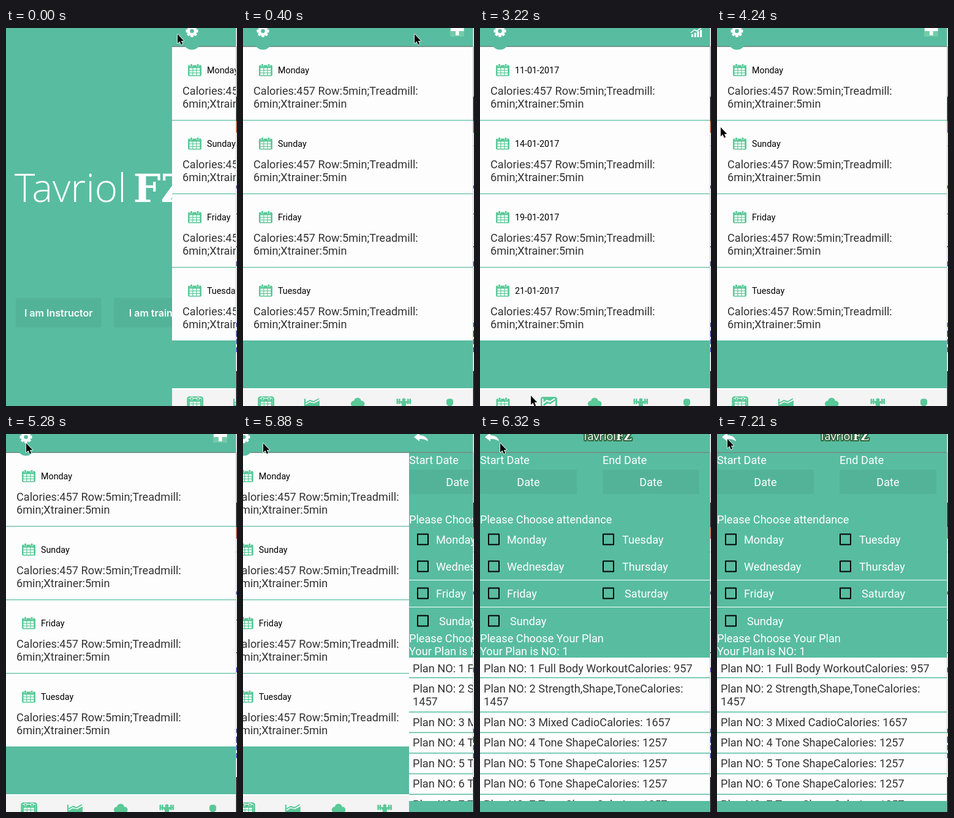
An HTML page with a canvas that plays this animation: 377 px wide and 617 px high, repeating every 8000 ms.

```html
<!DOCTYPE html>
<html lang="en">
<head>
<meta charset="utf-8">
<title>Workout planner</title>
<style>
html, body { margin: 0; width: 377px; height: 617px; overflow: hidden; background: #fff; }
canvas { display: block; }
</style>
</head>
<body>
<canvas id="stage" width="377" height="617"></canvas>
<script>
const c = document.getElementById('stage').getContext('2d');
const LOOP = 8000, W = 375, H = 617;
const TEAL = '#58bca0', DARK = '#53b398', GREEN = '#59c998', INK = '#333';
const BODY = '18.15px Roboto, sans-serif';
const DAYS = ['Monday', 'Sunday', 'Friday', 'Tuesday'];
const DATES = ['11-01-2017', '14-01-2017', '19-01-2017', '21-01-2017'];

function rect(x, y, w, h, color) {
  c.fillStyle = color;
  c.fillRect(x, y, w, h);
}

function round(x, y, w, h, r, color) {
  c.fillStyle = color;
  c.beginPath();
  c.roundRect(x, y, w, h, r);
  c.fill();
}

function disc(x, y, r, color) {
  c.fillStyle = color;
  c.beginPath();
  c.arc(x, y, r, 0, 7);
  c.fill();
}

function text(s, x, y, color = '#fff', font = BODY, align = 'left') {
  c.font = font;
  c.fillStyle = color;
  c.textAlign = align;
  c.fillText(s, x, y);
}

function shape(d, color, x = 0, y = 0) {
  c.save();
  c.translate(x, y);
  c.fillStyle = color;
  c.fill(new Path2D(d));
  c.restore();
}

function line(d, color, width, x = 0, y = 0) {
  c.save();
  c.translate(x, y);
  c.strokeStyle = color;
  c.lineWidth = width;
  c.lineJoin = 'round';
  c.stroke(new Path2D(d));
  c.restore();
}

function header() {
  rect(0, 0, W, 30, TEAL);
  rect(0, 29.5, W, 1.3, '#77857e');
}

function gear(x, y) {
  disc(x, y + 16, 14.5, TEAL);
  for (let i = 0; i < 8; i++) {
    c.save();
    c.translate(x, y);
    c.rotate(i * Math.PI / 4);
    round(-2.4, -10, 4.8, 6, 1, '#fff');
    c.restore();
  }
  disc(x, y, 7.6, '#fff');
  disc(x, y, 3.3, TEAL);
}

function calendar(x, y) {
  round(x, y + 2, 22, 18, 2, GREEN);
  for (const dx of [4, 14.5]) {
    round(x + dx - 0.8, y - 0.8, 4.6, 5.6, 2, '#fff');
    round(x + dx, y, 3, 4.5, 1.5, GREEN);
  }
  for (let i = 0; i < 9; i++)
    rect(x + 2.5 + i % 3 * 6, y + 7 + (i / 3 | 0) * 4.2, 4.8, 3, '#fff');
}

function tabs(active) {
  rect(0, 588, W, 29, '#f4f4f4');
  rect(0, 588, W, 2, '#fff');
  if (active === 0) line('M25.5 617V606Q25.5 602.5 29 602.5H46Q49.8 602.5 49.8 606V617', GREEN, 2.5);
  calendar(26.5, 603);
  if (active === 1) {
    round(99, 602, 27, 20, 4, GREEN);
    line('M102.5 605V617M103 613L109 608L114 610L122 605', '#fff', 2);
    shape('M104 617L110 613L115 614L123 608V617Z', '#f4f4f4');
  } else {
    line('M101 605V617M102 612L109 608L115 610L124 605', GREEN, 2);
    shape('M102 617V615L109 611L116 612.5L125 608V617Z', GREEN);
  }
  disc(187, 609.5, 6, GREEN);
  disc(181, 613.5, 5, GREEN);
  disc(193.5, 613.5, 5, GREEN);
  rect(181, 611, 13, 6, GREEN);
  rect(251, 609, 23, 1.8, GREEN);
  for (const x of [250.5, 254, 268, 271.5]) round(x, 605, 2.6, 9, 1, GREEN);
  disc(262.5, 607, 2.8, GREEN);
  shape('M256 610H269L266 614V617H259V614Z', GREEN);
  shape('M332 609Q332 605 337.5 605Q343 605 343 609V614L340 617H335L332 614Z', GREEN);
}

function listView(history) {
  rect(0, 0, W, H, TEAL);
  header();
  rect(0, 31, W, 479, '#fdfdfd');
  (history ? DATES : DAYS).forEach((label, i) => {
    const y = 30 + i * 120;
    calendar(26, y + 28.5);
    text(label, 57, y + 43.5, '#000', '14.3px Roboto, sans-serif');
    text('Calories:457 Row:5min;Treadmill:', 17, y + 78.5, INK);
    text('6min;Xtrainer:5min', 17, y + 100, INK);
    if (i < 3) rect(0, y + 120, W, 1.2, TEAL);
  });
  gear(32.5, 5);
  if (history) {
    for (let i = 0; i < 4; i++) rect(345 + i * 4.7, 10 - i * 2.3, 3, 5 + i * 2.3, '#fff');
    line('M344 8L350 3L354 5L362 -1', '#fff', 1.6);
  } else {
    round(338, -8, 23, 22, 2, '#74cba8');
    rect(339, 0, 21.5, 5, '#fff');
    rect(347, 0, 5.5, 12, '#fff');
  }
  tabs(history ? 1 : 0);
}

function welcomeView() {
  rect(0, 0, W, H, TEAL);
  text('Tavriol', 45, 284, '#fff', '300 64px "Open Sans", sans-serif');
  text('FZ', 239, 284, '#fff', 'bold 63px "DejaVu Serif", serif');
  ['I am Instructor', 'I am trainee'].forEach((label, i) => {
    round(47 + i * 160, 440, 140, 49, 4, DARK);
    text(label, 117 + i * 160, 470.5, '#fff', '600 16px Inter, sans-serif', 'center');
  });
}

function checkbox(label, x, y, gap = 31) {
  c.strokeStyle = '#000';
  c.lineWidth = 2;
  c.strokeRect(x + 1, y - 8.5, 17, 17);
  text(label, x + gap, y + 6.5);
}

function formHeader() {
  header();
  shape('M8 5L17 -2V2Q29 2 31 12Q25 7.5 17 8V12Z', '#fff');
  c.strokeStyle = '#2c6238';
  c.lineWidth = 4;
  c.lineJoin = 'round';
  const parts = [
    ['Tavriol', 167, '18px "Open Sans", sans-serif'],
    ['FZ', 222, 'bold 18px "DejaVu Serif", serif']
  ];
  for (const [s, x, font] of parts) {
    c.font = font;
    c.textAlign = 'left';
    c.strokeText(s, x, 10);
    text(s, x, 10, '#fff', font);
  }
}

function formView() {
  rect(0, 0, W, H, TEAL);
  formHeader();
  ['Start Date', 'End Date'].forEach((label, i) => {
    text(label, i * 200, 48.5);
    round(i * 200, 58, 158, 40, 2, DARK);
    text('Date', 79 + i * 200, 84.5, '#fff', BODY, 'center');
  });
  text('Please Choose attendance', 0, 145.5);
  checkbox('Monday', 13, 172);
  checkbox('Tuesday', 200, 172, 32);
  checkbox('Wednesday', 13, 216);
  checkbox('Thursday', 200, 216, 32);
  checkbox('Friday', 13, 260);
  checkbox('Saturday', 200, 260, 36);
  checkbox('Sunday', 13, 305, 36);
  rect(0, 238, W, 1, '#fff');
  rect(0, 282, W, 1, '#fff');
  text('Please Choose Your Plan', 0, 339.5);
  text('Your Plan is NO: 1', 0, 360.5);

  rect(0, 365, W, 235, '#fdfdfd');
  text('Plan NO: 1 Full Body WorkoutCalories: 957', 6, 388.5, INK);
  text('Plan NO: 2 Strength,Shape,ToneCalories:', 6, 421.5, INK);
  text('1457', 6, 443, INK);
  text('Plan NO: 3 Mixed CadioCalories: 1657', 6, 476.5, INK);
  rect(0, 397, W, 1.5, TEAL);
  for (let n = 4; n < 8; n++) {
    const y = 476.5 + (n - 3) * 33.6;
    text(`Plan NO: ${n} Tone ShapeCalories: 1257`, 6, y, INK);
    rect(0, y - 23.5, W, 1.5, TEAL);
  }
  rect(0, 453, W, 1.5, TEAL);
  rect(0, 599, W, 18, TEAL);
}

// Sliver of the desktop beside the phone window: top, height, colour
const EDGE = [[0, 30, '#e9e6e8'], [30, 82, '#c9bcc2'], [112, 40, '#111'], [152, 19, '#b5532f'],
  [192, 1, '#aaa'], [257, 5, '#3c4fa0'], [303, 1, '#333'], [356, 2, '#555'], [381, 8, '#3c4fa0'],
  [481, 7, '#3c4fa0'], [494, 10, '#223a8c'], [508, 8, '#3c4fa0'], [521, 8, '#223a8c'], [560, 57, '#000']];

function desktop() {
  rect(W, 0, 2, H, '#f5f5f7');
  for (const [y, h, color] of EDGE) rect(W + 0.5, y, 1.5, h, color);
  rect(W, 0, 0.6, H, '#a5b0ad');
}

// Pointer moves: first step, last step, number of steps, end point
const MOVES = [[690, 1730, 8, 40, 602], [2030, 2770, 6, 106, 602], [3220, 3220, 1, 83, 600],
  [3370, 3520, 2, 40, 603], [3810, 4240, 4, 6, 162], [4390, 4540, 2, 55, 33],
  [4830, 5280, 4, 33, 15], [6620, 6770, 2, 24, 10], [7060, 7210, 2, 17, 8]];

function pointer(t) {
  let x = 280, y = 10;
  for (const [from, to, steps, endX, endY] of MOVES) {
    if (t < from) break;
    const gap = (to - from) / (steps - 1) || 1;
    const p = Math.min(steps, 1 + Math.floor((t - from) / gap + 0.01)) / steps;
    const e = p * p * (3 - 2 * p);
    x += (endX - x) * e;
    y += (endY - y) * e;
  }
  const arrow = 'M0 0V15L3.4 11.8L5.8 17.3L8.2 16.2L5.9 11H10.3Z';
  line(arrow, '#fff', 1.6, x, y);
  shape(arrow, '#000', x, y);
}

function place(view, x, arg) {
  c.save();
  c.translate(x, 0);
  view(arg);
  c.restore();
}

// The new page slides in from the right; the old one follows at 30%
function push(below, above, step) {
  const x = step > 2 ? 0 : Math.round(271 * 0.203 ** step);
  if (x) place(below, -0.3 * (W - x));
  place(above, x);
}

function draw(t) {
  c.save();
  c.beginPath();
  c.rect(0, 0, W, H);
  c.clip();
  if (t < 400) push(welcomeView, listView, t < 140 ? 0 : 1 + Math.floor((t - 140) / 130));
  else if (t < 5880) listView(t >= 2770 && t < 3665);
  else push(listView, formView, Math.floor((t - 5880) * 3 / 440));
  c.restore();
  desktop();
  pointer(t);
}

function tick() {
  draw(performance.now() % LOOP);
  requestAnimationFrame(tick);
}
tick();
</script>
</body>
</html>
```
